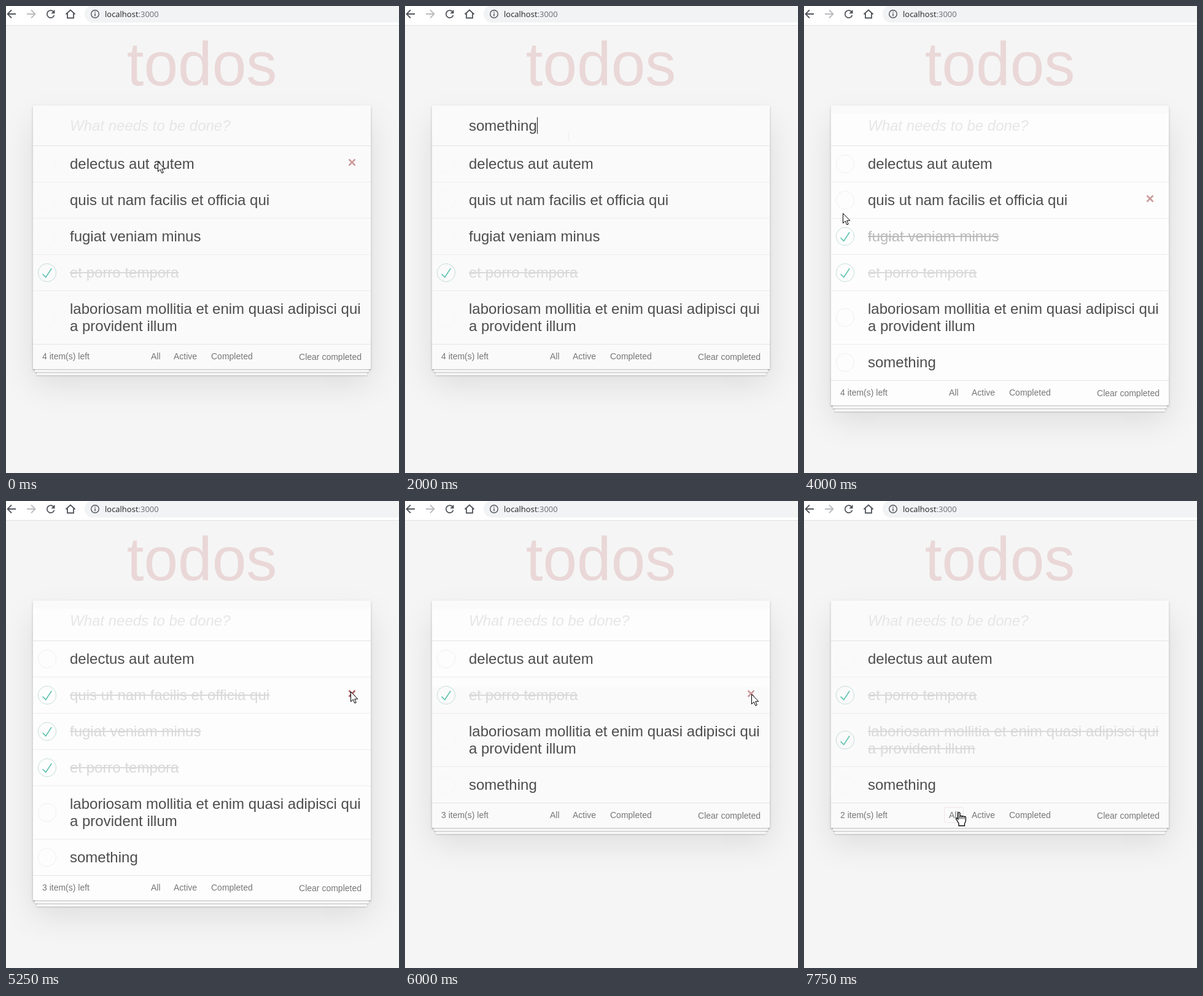
Recreate the animation shown at these times as an HTML page. Size 640x760 px, loop 8000 ms.

```html
<!DOCTYPE html>
<html lang="en">
<head>
<meta charset="utf-8">
<title>todos</title>
<style>
html, body { margin: 0; width: 100%; height: 100%; overflow: hidden; background: #f5f5f5; }
#stage { position: relative; width: 640px; height: 760px; overflow: hidden; background: #f5f5f5;
  font: 24px/28px "Liberation Sans", Arial, sans-serif; color: #4d4d4d; white-space: nowrap; }
#stage svg { position: absolute; overflow: visible; }
#bar { left: 0; top: 0; }
#bar text { font: 13px "Open Sans", sans-serif; }
h1 { position: absolute; left: 44px; width: 550px; top: 38px; margin: 0; text-align: center;
  font-size: 100px; font-weight: normal; line-height: 112px; color: rgba(175, 47, 47, .15); }
#panel { position: absolute; left: 44px; top: 162px; width: 550px;
  box-shadow: 0 2px 4px rgba(0, 0, 0, .2), 0 25px 50px rgba(0, 0, 0, .1); }
#panel > * { position: absolute; }
#entry { left: 60px; top: 19px; }
.hint { position: absolute; left: 0; font-style: italic; color: #e6e6e6; }
.caret { display: inline-block; width: 1px; height: 27px; background: #222; vertical-align: top; }
.line { left: 0; width: 550px; height: 1px; background: #ededed; }
.line.strong { background: #e4e4e4; }
.label { left: 60px; }
.done { text-decoration: line-through; }
#foot { left: 0; bottom: 0; width: 550px; height: 41px; font-size: 14px; line-height: 20px; color: #777; }
#foot::before { content: ""; position: absolute; left: 0; right: 0; bottom: 0; height: 50px;
  box-shadow: 0 1px 1px rgba(0, 0, 0, .2), 0 8px 0 -3px #f6f6f6, 0 9px 1px -3px rgba(0, 0, 0, .2),
    0 16px 0 -6px #f6f6f6, 0 17px 2px -6px rgba(0, 0, 0, .2); }
#foot span { position: absolute; top: 10px; }
#foot .box { top: 7px; padding: 2px 7px; margin-left: -8px; border: 1px solid rgba(175, 47, 47, .1);
  border-radius: 3px; }
</style>
</head>
<body>
<div id="stage">
  <svg id="bar" width="640" height="32" fill="none" stroke="#50545a" stroke-width="1.8">
    <path d="M0 0H640V31H0Z" fill="#fff" stroke="none"/>
    <path d="M640 -1H142a14 14 0 0 0 0 28H640Z" fill="#f1f3f4" stroke="none"/>
    <path d="M0 31.5H640" stroke="#dfe1e3" stroke-width="1"/>
    <path d="M16 13H3M9 6.5L2.5 13 9 19.5"/>
    <path d="M34 13H47M41 6.5L47.5 13 41 19.5" stroke="#b9bbbe"/>
    <path d="M77.3 9.2A6 6 0 1 0 78.5 15"/>
    <path d="M79.5 6V12.2H73.3Z" fill="#50545a" stroke="none"/>
    <path d="M97.5 13.5L105 6.5 112.5 13.5M100 12V19.5H110V12"/>
    <circle cx="145" cy="13" r="6.3" stroke-width="1.4"/>
    <path d="M145 12V16.6M145 9.2V10.8" stroke-width="1.5"/>
    <text x="161" y="18" fill="#202124" stroke="none">localhost<tspan fill="#6a6e73">:3000</tspan></text>
  </svg>
  <h1>todos</h1>
  <div id="panel"></div>
  <svg id="pointer" width="20" height="26"></svg>
</div>
<script>
const LOOP = 8000, STEP = 250, TOP = 162, LIST = 228;
const panel = document.getElementById('panel');
const pointer = document.getElementById('pointer');

const items = [
  { text: 'delectus aut autem' },
  { text: 'quis ut nam facilis et officia qui', done: 4250, gone: 5500 },
  { text: 'fugiat veniam minus', done: 3750, gone: 6000 },
  { text: 'et porro tempora', done: -1000 },
  { text: 'laboriosam mollitia et enim quasi adipisci qui<br>a provident illum', done: 6750, tall: true },
  { text: 'something', from: 2500 }
];

// time, x, y, shape
const moves = [
  [0, 247, 253, 'arrow'], [250, 263, 204, 'beam'], [500, 263, 204, 'faint'], [2500, 0, 0, ''],
  [3000, 252, 240, 'arrow'], [3250, 212, 279, 'arrow'], [3500, 104, 358, 'arrow'],
  [3750, 66, 374, 'arrow'], [4000, 63, 337, 'arrow'], [4250, 64, 318, 'arrow'],
  [4500, 70, 317, 'arrow'], [4750, 240, 318, 'arrow'], [5000, 480, 314, 'arrow'],
  [5250, 561, 310, 'arrow'], [5750, 563, 312, 'arrow'], [6000, 564, 314, 'arrow'],
  [6250, 360, 358, 'arrow'], [6500, 76, 388, 'arrow'], [6750, 66, 388, 'arrow'],
  [7000, 68, 391, 'arrow'], [7250, 140, 446, 'arrow'], [7500, 225, 487, 'arrow'],
  [7750, 247, 506, 'hand']
];

const beam = color => `<path d="M0.5 .5H2.5L3.5 1.5 4.5 .5H6.5M3.5 1.5V15.5M0.5 16.5H2.5L3.5 15.5 4.5 16.5H6.5"
  fill="none" stroke="${color}"/>`;
const shapes = {
  '': '',
  arrow: '<path d="M.5 .5V16.5L4.2 13 6.8 19 9.3 18 6.7 12.2H11.8Z" fill="#fff" stroke="#000"/>',
  beam: beam('#333'),
  faint: beam('#efefef'),
  hand: `<path d="M5.5 .7C4.6 .7 4 1.4 4 2.3V12L2.6 10.4C1.8 9.6 .8 9.8 .6 10.7 .5 11.3 .8 11.9 1.2 12.5L5 18.5V22.5
    H14.5V19C15.5 17.5 16.4 16 16.4 13.5V8.8C16.4 7 14 7 13.6 8.4 13.4 6.5 10.9 6.3 10.3 7.6 10 6 7.6 6 7 7V2.3
    C7 1.4 6.4 .7 5.5 .7Z" fill="#fff" stroke="#000" stroke-width="1.3"/>
    <path d="M7 7V11.5M10.3 7.6V11.5M13.6 8.4V11.5" stroke="#000" stroke-width="1.2"/>`
};

const line = (y, cls = '') => `<div class="line ${cls}" style="top:${y - TOP}px"></div>`;

function check(y, done, ring) {
  const tick = '<path d="M72 25L42 71 27 56l-4 4 20 20 34-52z" fill="#5dc2af"/>';
  return `<svg style="left:8px;top:${y - TOP - 15}px" width="30" height="30" viewBox="-1 -1 102 102">
    <circle cx="50" cy="50" r="50" fill="none" stroke="${done ? '#bddad5' : ring}" stroke-width="3"/>
    ${done ? tick : ''}</svg>`;
}

const cross = (y, color) => `<svg style="left:514px;top:${y - TOP}px" width="11" height="11">
  <path d="M.5 .5L10.5 10.5M10.5 .5L.5 10.5" stroke="${color}" stroke-width="2.5"/></svg>`;

function inkOf(item, t) {
  const age = t - item.done;
  if (!(age >= 0)) return '#4d4d4d';
  return age < 250 ? '#6b6b6b' : age < 500 ? '#bbb' : '#d9d9d9';
}

function entry(t) {
  const typing = t >= 1000 && t < 2500;
  const typed = typing ? 'something'.slice(0, 1 + 2 * Math.floor((t - 1000) / STEP)) : '';
  const caret = t >= 500 && t < 3000 ? '<i class="caret"></i>' : '';
  const hint = typing ? '' : '<span class="hint">What needs to be done?</span>';
  return `<div id="entry">${hint}${typed}${caret}</div>`;
}

function footer(left, overAll) {
  return `<div id="foot"><span style="left:15px">${left} item(s) left</span>
    <span class="${overAll ? 'box' : ''}" style="left:192px">All</span>
    <span style="left:229px">Active</span><span style="left:290px">Completed</span>
    <span style="right:15px;top:11px">Clear completed</span></div>`;
}

function draw(t) {
  const [, px, py, shape] = moves.filter(m => m[0] <= t).pop();
  // lower edge of the brighter part of the card
  const bright = t < 2500 || t >= 6750 ? 0 : t < 5500 ? 760 : 303;
  const shown = items.filter(i => t >= (i.from || 0) && !(t >= i.gone));
  const justRemoved = items.some(i => i.gone === t);
  let y = LIST, left = 0;
  let html = entry(t) + line(LIST - 1, 'strong');

  shown.forEach((item, n) => {
    const h = item.tall ? 86 : 58, done = t >= item.done;
    if (!done) left++;
    html += check(y + h / 2, done, y < bright ? '#ededed' : '#f6f6f6');
    html += `<div class="label ${done ? 'done' : ''}"
      style="top:${y + 15 - TOP}px;color:${inkOf(item, t)}">${item.text}</div>`;
    if (shape === 'arrow' && py >= y && py <= y + h) {
      const hot = px > 556 && px < 572 && !justRemoved;
      html += cross(y + h / 2 - 8, hot ? '#af5b5e' : '#cc9a9a');
    }
    y += h;
    html += line(y, n === shown.length - 1 ? 'strong' : '');
    y++;
  });

  panel.style.height = y - 1 + 41 - TOP + 'px';
  panel.style.background = bright
    ? `linear-gradient(#fafafa 13px, #fdfdfd 13px ${bright - TOP}px, #fafafa ${bright - TOP}px)`
    : '#fafafa';
  panel.innerHTML = html + footer(left, shape === 'hand');
  pointer.style.left = px + 'px';
  pointer.style.top = py + 'px';
  pointer.innerHTML = shapes[shape];
}

let last = -1;
const start = performance.now();
function tick() {
  const t = Math.floor(((performance.now() - start) % LOOP) / STEP) * STEP;
  if (t !== last) draw(last = t);
  requestAnimationFrame(tick);
}
tick();
</script>
</body>
</html>
```
